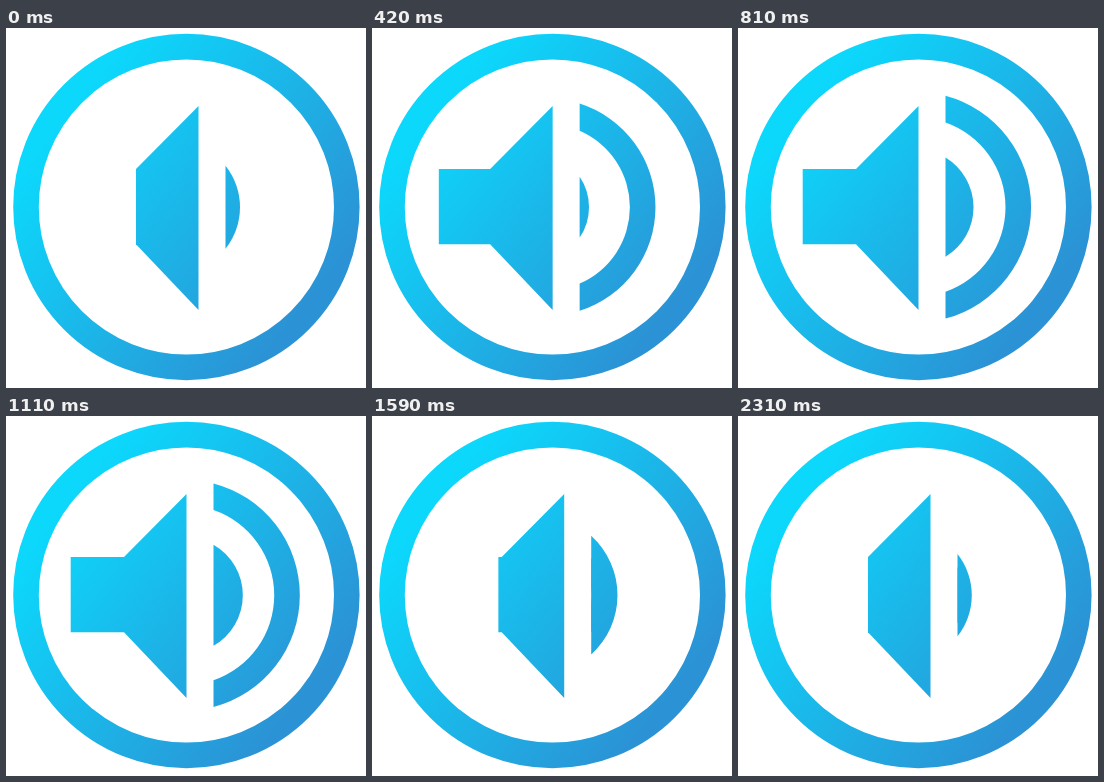
Animation, 360 px wide and 360 px high, one loop 2.37 s. Source, as an HTML page:

```html
<!DOCTYPE html>
<html lang="en">
<head>
<meta charset="utf-8">
<title>Volume icon</title>
<style>
  html, body { margin: 0; width: 100%; height: 100%; overflow: hidden; background: #fff; }
  svg { display: block; width: 100%; height: 100%; }
</style>
</head>
<body>
<svg viewBox="0 0 360 360">
  <defs>
    <linearGradient id="blue" gradientUnits="userSpaceOnUse" x1="60" y1="85" x2="300" y2="275">
      <stop offset="0" stop-color="#0cd8fc"/>
      <stop offset="1" stop-color="#2b93d5"/>
    </linearGradient>
  </defs>
  <circle cx="180.4" cy="179" r="160.4" fill="none" stroke="url(#blue)" stroke-width="25.6"/>
  <g fill="url(#blue)" fill-rule="evenodd">
    <path id="speaker"/>
    <path id="outer"/>
    <path id="inner"/>
  </g>
</svg>
<script>
const LOOP = 2370, STEP = 30, OPEN = 180, CLOSE = 1380, LENGTH = 930;
const MID = 179.2, BAND = 25.6, GAP = 27;

const [speaker, outer, inner] = ['speaker', 'outer', 'inner'].map(id => document.getElementById(id));
const mix = (a, b, p) => a + (b - a) * p;
const decay = (t, tau) => 1 - Math.exp(-t / tau);
const spring = (t, tau) => 1 - (1 + t / tau) * Math.exp(-t / tau);

// Part of a disc to the right of the vertical line at x
function segment(x, c, r) {
  if (r <= 0 || c + r <= x) return '';
  const h = Math.sqrt(r * r - (x - c) ** 2);
  return `M${x} ${MID - h}A${r} ${r} 0 0 1 ${x} ${MID + h}Z`;
}

function draw(time) {
  const t = Math.floor((time % LOOP) / STEP) * STEP;
  const closing = t >= CLOSE;
  const e = Math.min(LENGTH, Math.max(0, t - (closing ? CLOSE : OPEN)));
  const openness = tau => closing ? 1 - spring(e, tau) : spring(e, tau);

  const edge = 192.5 - 12 * openness(37.5);
  const neck = edge - 62.5;
  const left = neck - 53.3 * openness(47);
  speaker.setAttribute('d',
    `M${left} 141H${neck}L${edge} 78V282L${neck} 216.3H${left}Z`);

  // Waves as [centre, radius]; the inner one takes over the resting place on closing
  let big, small;
  if (closing) {
    big = [mix(178.4, 160, decay(e, 170)), mix(115.6, 65.6, decay(e, 170))];
    small = [mix(178.7, 167.5, decay(e, 90)), mix(58.3, 66.5, decay(e, 260))];
  } else {
    big = [mix(167.5, 178.4, decay(e, 220)), mix(66.5, 115.6, decay(e, 122))];
    small = [mix(101, 178.7, decay(e, 150)), mix(37, 58.3, decay(e, 150))];
  }
  const x = edge + GAP;
  outer.setAttribute('d', segment(x, ...big) + segment(x, big[0], big[1] - BAND));
  inner.setAttribute('d', segment(x, ...small));
}

const start = performance.now();
function tick() {
  draw(performance.now() - start);
  requestAnimationFrame(tick);
}
tick();
</script>
</body>
</html>
```
